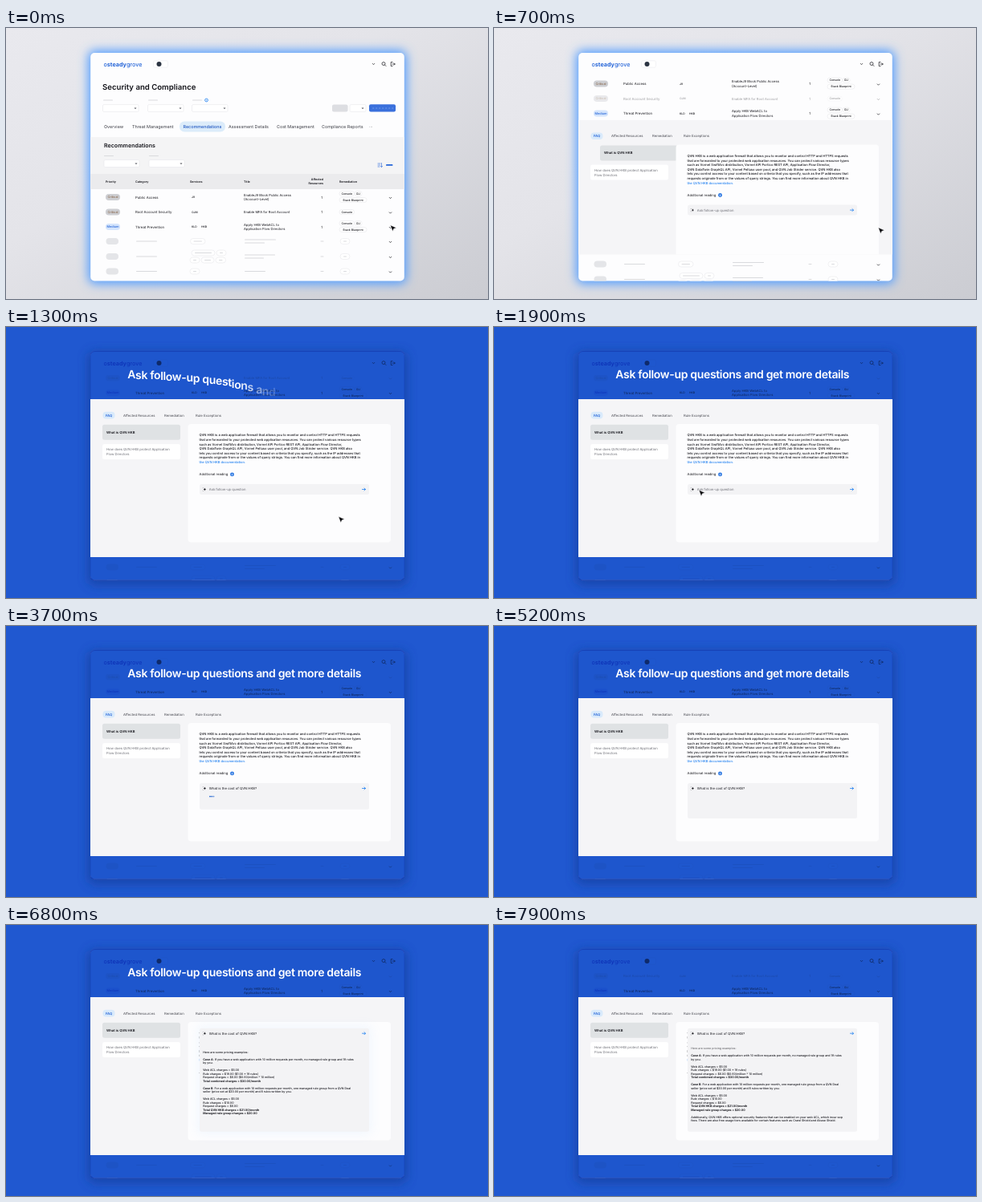
These frames come from a looping animation (600 px wide and 338 px high, 8000 ms). An HTML page:

```html
<!DOCTYPE html>
<html lang="en">
<head>
<meta charset="utf-8">
<title>Follow-up questions</title>
<style>
html, body { margin: 0; width: 100%; height: 100%; overflow: hidden; background: #dcdce1; }
svg { display: block; width: 100vw; height: 100vh; }
text { font-family: Inter, "Liberation Sans", sans-serif; text-rendering: geometricPrecision; white-space: pre; }
</style>
</head>
<body>
<svg id="stage" viewBox="0 0 600 338" preserveAspectRatio="none">
  <defs>
    <linearGradient id="wall" x1="0" y1="0" x2="1" y2="1">
      <stop offset="0" stop-color="#e9e9ee"/><stop offset=".4" stop-color="#e4e4e9"/><stop offset="1" stop-color="#cbccd2"/>
    </linearGradient>
    <filter id="blur" x="-20%" y="-20%" width="140%" height="140%"><feGaussianBlur stdDeviation="6.5"/></filter>
    <clipPath id="listClip"><rect x="105" y="60" width="391" height="255.5"/></clipPath>
    <clipPath id="panelClip"><rect id="panelWindow" x="105" y="256" width="391" height="0"/></clipPath>
  </defs>
</svg>
<script>
const stage = document.getElementById('stage');
const LOOP = 8000, STEP = 100;
const INK = '#15151b', GREY = '#6b6c74', BLUE = '#2464d8', LINK = '#1f7ff0';

// --- drawing helpers ---
function el(parent, tag, attrs = {}, content) {
  const node = document.createElementNS('http://www.w3.org/2000/svg', tag);
  for (const k in attrs) node.setAttribute(k, attrs[k]);
  if (content !== undefined) node.textContent = content;
  return parent.appendChild(node);
}
const group = (p, attrs) => el(p, 'g', attrs);
const box = (p, x, y, width, height, fill, rx = 0, more = {}) =>
  el(p, 'rect', { x, y, width, height, fill, rx, ...more });
const text = (p, x, y, size, s, fill = INK, weight = 400, more = {}) =>
  el(p, 'text', { x, y, 'font-size': size, fill, 'font-weight': weight, ...more }, s);
const line = (p, d, stroke = INK, w = .7) =>
  el(p, 'path', { d, stroke, 'stroke-width': w, fill: 'none', 'stroke-linecap': 'round', 'stroke-linejoin': 'round' });
const dot = (p, cx, cy, r, fill, more = {}) => el(p, 'circle', { cx, cy, r, fill, ...more });
const bar = (p, x, y, w, fill = '#d9dadd') => box(p, x, y - .5, w, 1, fill, .5);
const chevron = (p, x, y, s = 1.3) => line(p, `M${x - s} ${y - s / 2}l${s} ${s}l${s} ${-s}`);
const pill = (p, x, y, w, h = 6) =>
  box(p, x, y - h / 2, w, h, '#fff', h / 2, { stroke: '#e2e3e7', 'stroke-width': .5 });
function tag(p, x, y, w, s) {
  pill(p, x, y, w);
  text(p, x + w / 2, y + 1.2, 3.5, s, INK, 500, { 'text-anchor': 'middle' });
}
function select(p, x, y, w) {
  box(p, x, y, w, 9, '#fff', 1.5, { stroke: '#e2e3e7', 'stroke-width': .5 });
  el(p, 'path', { d: `M${x + w - 5.5} ${y + 4}h3l-1.5 1.8z`, fill: '#55565e' });
}

// --- timing helpers ---
const ramp = (t, a, b) => Math.min(1, Math.max(0, (t - a) / (b - a)));
const mix = (a, b, u) => a + (b - a) * u;
const inOut = u => u < .5 ? 2 * u * u : 1 - 2 * (1 - u) ** 2;
const cubicInOut = u => u < .5 ? 4 * u ** 3 : 1 - 4 * (1 - u) ** 3;
const show = (node, v) => node.setAttribute('opacity', v);
const move = (node, x, y) => node.setAttribute('transform', `translate(${x} ${y})`);

// --- backdrop and window ---
box(stage, 0, 0, 600, 338, 'url(#wall)');
const halo = box(stage, 102.5, 28, 396, 291, '#4f9bff', 8, { filter: 'url(#blur)' });
const blueWall = box(stage, 0, 0, 600, 338, '#2058d0');
const shade = box(stage, 102, 31, 397, 291, '#123f9f', 8, { filter: 'url(#blur)' });
box(stage, 105.2, 31, 390.6, 284.5, '#fdfdfe', 5);

// --- scrolling list ---
const listArea = group(stage, { 'clip-path': 'url(#listClip)' });
const list = group(listArea);
text(list, 120, 77, 9.6, 'Security and Compliance', INK, 600);
[121, 177, 232].forEach(x => { bar(list, x, 90, 12); select(list, x - .5, 95.5, 44.5); });
dot(list, 249.5, 90, 1.9, 'none', { stroke: LINK, 'stroke-width': .8 });
bar(list, 249, 90, 1, LINK);
box(list, 406, 95.5, 19.5, 9, '#dddee2', 2);
select(list, 428, 95.5, 20);
box(list, 452, 95.3, 33, 9.2, '#3a70dc', 2);
for (let x = 456; x < 481; x += 4) bar(list, x, 100, 2.4, '#6f98e8');

box(list, 216, 116.5, 57, 13, '#dcecfa', 6);
[[122, 'Overview'], [157, 'Threat Management'], [220.5, 'Recommendations', '#1d55c0', 500],
 [277, 'Assessment Details'], [337, 'Cost Management'], [393, 'Compliance Reports'], [452, '···']]
  .forEach(([x, s, c = '#3b3c44', w]) => text(list, x, 125, 5.4, s, c, w));

box(list, 105.2, 136, 390.6, 46, '#f4f4f5');
text(list, 122, 149.3, 7.1, 'Recommendations', INK, 600);
[122, 178].forEach(x => { bar(list, x, 159.5, 12); select(list, x, 164.5, 44); });
line(list, 'M463 169h3M463 171h2.5M463 173h2M467.5 168.5v5l-1.2-1.2m1.2 1.2l1.2-1.2', BLUE, .6);
box(list, 473, 170, 8.5, 1.8, BLUE, .9);

box(list, 105.2, 182, 390.6, 19, '#ebebed');
[[124, 'Priority'], [161, 'Category'], [229, 'Services'], [296, 'Title'], [415, 'Remediation']]
  .forEach(([x, s]) => text(list, x, 193, 3.65, s, INK, 600));
['Affected', 'Resources'].forEach((s, i) =>
  text(list, 395, 190.3 + 5 * i, 3.65, s, INK, 600, { 'text-anchor': 'end' }));

function row(p, y, level, category, services, title, extra) {
  const medium = level === 'Medium';
  box(p, 124, y - 4, 18, 8, medium ? '#d5e5fc' : '#cdced2', 4);
  text(p, 133, y + 1.4, 3.9, level, medium ? BLUE : '#8a6a50', 500, { 'text-anchor': 'middle' });
  text(p, 161, y + 1.5, 4.3, category);
  services.forEach((s, i) => text(p, 231 + 12 * i, y + 1.2, 3.4, s, INK, 500));
  title.forEach((s, i) => text(p, 296, y + 1.5 + (i - (title.length - 1) / 2) * 5.6, 4.15, s));
  text(p, 392.3, y + 1.5, 4.3, '1');
  tag(p, 415, y - (extra ? 4.5 : 0), 18.5, 'Console');
  if (extra) {
    tag(p, 434, y - 4.5, 9, 'CLI');
    tag(p, 415, y + 3.5, 34, 'Stack Blueprint');
  }
  chevron(p, 478.5, y + 1);
}
row(list, 211, 'Critical', 'Public Access', ['J9'], ['EnableJ9 Block Public Access', '(Account-Level)'], true);
const rowAbove = group(list);
row(rowAbove, 229.5, 'Critical', 'Root Account Security', ['OJM'], ['Enable MFA for Root Account']);
row(list, 248, 'Medium', 'Threat Prevention', ['KLD', 'HKB'],
  ['Apply HKB WebACL to', 'Application Flow Directors'], true);

const rowsBelow = group(listArea);
function blankRow(y, pills, lines) {
  box(rowsBelow, 124.5, y - 4, 15.5, 8, '#e4e5e8', 4);
  bar(rowsBelow, 162, y, 26);
  pills.forEach(([x, dy, w]) => { pill(rowsBelow, x, y + dy, w, 7); bar(rowsBelow, x + 4, y + dy, w - 8); });
  lines.forEach((w, i) => bar(rowsBelow, 297, y + (i - (lines.length - 1) / 2) * 4, w));
  bar(rowsBelow, 391.5, y, 4);
  pill(rowsBelow, 416, y, 12, 7);
  bar(rowsBelow, 420, y, 4);
  chevron(rowsBelow, 478.5, y + 1);
}
blankRow(266, [[229.5, 0, 18.5]], [39, 25]);
blankRow(285, [[231, -4.5, 29], [262, -4.5, 12], [229, 4.5, 12], [243, 4.5, 16], [261, 4.5, 12.5]], [38, 24]);
blankRow(303.5, [[229, 0, 12]], [26]);

// --- window header ---
const brand = text(stage, 121.5, 47.6, 7.2, '', BLUE);
[['o', 500], ['steady', 700], ['grove', 500]].forEach(([s, w]) => el(brand, 'tspan', { 'font-weight': w }, s));
box(stage, 183.5, 40.8, 18, 8.4, '#fff', 2, { stroke: '#e6e7ea', 'stroke-width': .5 });
dot(stage, 190.5, 45, 3, '#2b3442');
chevron(stage, 457.5, 45);
dot(stage, 470, 44.5, 2, 'none', { stroke: INK, 'stroke-width': .7 });
line(stage, 'M471.5 46l1.5 1.5M481 42.5h-1.8v5h1.8M481 45h3.2m-1.2-1.2l1.2 1.2l-1.2 1.2');

// Blue tint over the window: multiply keeps the text dark, the wash softens it.
const multiply = box(stage, 105, 30.8, 391, 285, '#1f57cd', 5, { style: 'mix-blend-mode:multiply' });
const wash = box(stage, 105, 30.8, 391, 285, '#1f57cd', 5);

// --- expanded detail panel ---
const panelArea = group(stage, { 'clip-path': 'url(#panelClip)' });
const panel = group(panelArea);
box(panel, 105, 90, 391, 197, '#f5f5f7');
box(panel, 120.5, 105.8, 15, 8.6, '#d9eafb', 4);
[[124, 'FAQ', BLUE, 600], [146, 'Affected Resources'], [197, 'Remediation'], [236, 'Rule Exceptions']]
  .forEach(([x, s, c = '#45464e', w]) => text(panel, x, 111.7, 4.25, s, c, w));
const topic = group(panel);
box(topic, 120, 121.8, 97, 19, '#dfe2e4', 2.5);
text(topic, 125, 132.9, 4.2, 'What is QVN HKB', INK, 600);
box(panel, 120, 146, 97, 19, '#fff', 2.5);
text(panel, 125, 154.4, 4.2, 'How does QVN HKB protect Application', GREY);
text(panel, 125, 160, 4.2, 'Flow Directors', GREY);
box(panel, 226.5, 121, 252.5, 147.5, '#fdfdfe', 4);
['QVN HKB is a web application firewall that allows you to monitor and control HTTP and HTTPS requests',
 'that are forwarded to your protected web application resources. You can protect various resource types',
 'such as Vornel SwiftArc distribution, Vornel API Portico REST API, Application Flow Director,',
 'QVN DataTwin GraphQL API, Vornel Pelluso user pool, and QVN Job Strider service. QVN HKB also',
 'lets you control access to your content based on criteria that you specify, such as the IP addresses that',
 'requests originate from or the values of query strings. You can find more information about QVN HKB in']
  .forEach((s, i) => text(panel, 240.5, 136.4 + 5.6 * i, 4.07, s, INK, 500));
text(panel, 240.5, 170, 4.1, 'the QVN HKB documentation.', LINK, 500);
text(panel, 240.5, 185.4, 4.2, 'Additional reading');
dot(panel, 281.5, 183.9, 2.4, '#1f6fe0');
line(panel, 'M281.5 182.8v2.2m-.9-.9l.9.9l.9-.9', '#fff', .5);

// --- question box; its content hangs from the top edge ---
const glow = box(panel, 238, 0, 217, 0, '#8fc2fb', 5, { filter: 'url(#blur)' });
const ask = box(panel, 241, 196, 211, 13, '#f3f3f5', 2.5);
const chat = group(panel);
el(chat, 'path', { d: 'M247.4 4.6q.1 1.8 1.9 1.9q-1.8.1-1.9 1.9q-.1-1.8-1.9-1.9q1.8-.1 1.9-1.9z', fill: INK });
[4.8, 8.2].forEach(y => dot(chat, 245.2, y, .35, INK));
line(chat, 'M443.5 6.5h4m-1.5-1.5l1.5 1.5l-1.5 1.5', LINK, .8);
const question = text(chat, 252.8, 8, 4.2, '');
const dots = [0, 1, 2].map(i => dot(chat, 254 + 2.2 * i, 16.6, .95, '#1f63d0'));

// Text before "|" is bold.
const answer = [
  '|The cost of QVN HKB depends on the following three factors:', '|',
  '|1. Number of web access control lists (web ACLs) created',
  '|2. Number of rules added per web ACL',
  '3. Number of web requests processed by the web ACL|', '|',
  'Pricing is the same across all QVN Regions, and monthly fees are prorated hourly.| Charges for QVN HKB are',
  '|additional to the costs of related QVN services such as Vornel SwiftArc, Application Flow Director (AFD),',
  '|API Portico, and QVN DataTwin.', '|',
  '|Here are some pricing examples:', '|',
  'Case A:| If you have a web application with 10 million requests per month, no managed rule group and 19 rules',
  '|by you.', '|',
  '|Web ACL charges = $5.00',
  '|Rule charges = $19.00 ($1.00 * 19 rules)',
  '|Request charges = $6.00 ($0.60/million * 10 million)',
  'Total combined charges = $30.00/month|', '|',
  'Case B:| For a web application with 10 million requests per month, one managed rule group from a QVN Deal',
  '|seller (price set at $20.00 per month) and 8 rules written by you.', '|',
  '|Web ACL charges = $5.00',
  '|Rule charges = $10.00',
  '|Request charges = $6.00',
  'Total QVN HKB charges = $21.00/month|',
  'Managed rule group charges = $20.00|', '|',
  '|Additionally, QVN HKB offers optional security features that can be enabled on your web ACL, which incur sep',
  '|fees. There are also free usage tiers available for certain features such as Crawl Shield and Abuse Shield.'
].map(s => {
  const [bold, plain] = s.split('|'), node = text(chat, 245.2, 0, 3.6, '', INK, 500);
  return { bold, plain, node, b: el(node, 'tspan', { 'font-weight': 700 }), n: el(node, 'tspan') };
});

// --- headline and pointer ---
const headline = text(stage, 151.3, 64, 14, '', '#fff', 600, { 'letter-spacing': -.34 });
const letters = [...'Ask follow-up questions and get more details'].map(c => el(headline, 'tspan', {}, c));
const pointer = el(stage, 'path', { d: 'M0 0L7.4 3.2L4.2 4.3L2.8 7.4Z', fill: '#08080c', stroke: '#fff', 'stroke-width': .4 });

function drawList(t) {
  const e = cubicInOut(ramp(t, 100, 1000)), o = ramp(t, 960, 1270);
  move(list, 0, -166 * e);
  move(rowsBelow, 0, 33.5 * e);
  move(panel, 0, 166 * (1 - e));
  move(topic, 12 * (1 - ramp(t, 700, 1300)), 0);
  const win = document.getElementById('panelWindow');
  win.setAttribute('y', 256 - 166 * e);
  win.setAttribute('height', 197 * e);
  show(rowAbove, 1 - .7 * e);
  show(rowsBelow, 1 - .3 * o);
  show(halo, 1 - o);
  show(blueWall, o);
  show(shade, .75 * o);
  show(wash, .35 * o * o);
  show(multiply, o);
}

function drawHeadline(t) {
  let last = 0;
  letters.forEach((node, i) => {
    const left = (1 - ramp(t, 1000 + 11 * i, 1400 + 11 * i)) ** 3, drop = 25 * left;
    node.setAttribute('dy', drop - last);
    node.setAttribute('fill-opacity', Math.min(1, 2 * (1 - left)));
    last = drop;
  });
  show(headline, t < 7900 ? 1 : 0);
}

function drawPointer(t) {
  const u = inOut(ramp(t, 920, 1920));
  move(pointer, mix(478.5, 255, u), mix(mix(246, 250, ramp(t, 0, 900)), 203.5, u));
  show(pointer, 1 - ramp(t, 2200, 2500));
}

function drawChat(t) {
  const rise = inOut(ramp(t, 5200, 5900));
  const top = mix(196, 128.7, rise);
  const open = 1 - (1 - ramp(t, 3500, 4000)) ** 2;
  const bottom = mix(mix(209, 240, open), 257.7, rise);
  for (const [node, pad] of [[ask, 0], [glow, 3]]) {
    node.setAttribute('y', top - pad);
    node.setAttribute('height', bottom - top + 2 * pad);
  }
  show(glow, .6 * ramp(t, 5400, 6000) * (1 - ramp(t, 6300, 6900)));
  move(chat, 0, top);

  const ready = t < 2200, asked = 'What is the cost of QVN HKB?';
  question.textContent = ready ? 'Ask follow-up question' : asked.slice(0, Math.round(asked.length * ramp(t, 2300, 3400)));
  question.setAttribute('fill', ready ? GREY : INK);
  dots.forEach((d, i) => show(d, t >= 3600 && t < 4800 ? .75 + .25 * Math.cos((t - 3700) / 130 - i * .9) : 0));

  const typed = 21.08 * ramp(t, 5500, 6100) + 9.92 * ramp(t, 6100, 7000);
  const scroll = Math.min(10, Math.max(0, Math.floor(typed) - 19));
  answer.forEach(({ bold, plain, node, b, n }, i) => {
    const count = Math.round((bold.length + plain.length) * ramp(typed, i, i + 1));
    b.textContent = bold.slice(0, count);
    n.textContent = plain.slice(0, Math.max(0, count - bold.length));
    node.setAttribute('y', 26.5 + 4.5 * (i - scroll));
    show(node, i < scroll ? 0 : i === scroll && scroll ? .6 : 1);
  });
}

function frame(now) {
  const t = Math.floor(now % LOOP / STEP) * STEP;
  drawList(t);
  drawHeadline(t);
  drawPointer(t);
  drawChat(t);
  requestAnimationFrame(frame);
}
frame(0);
</script>
</body>
</html>
```
